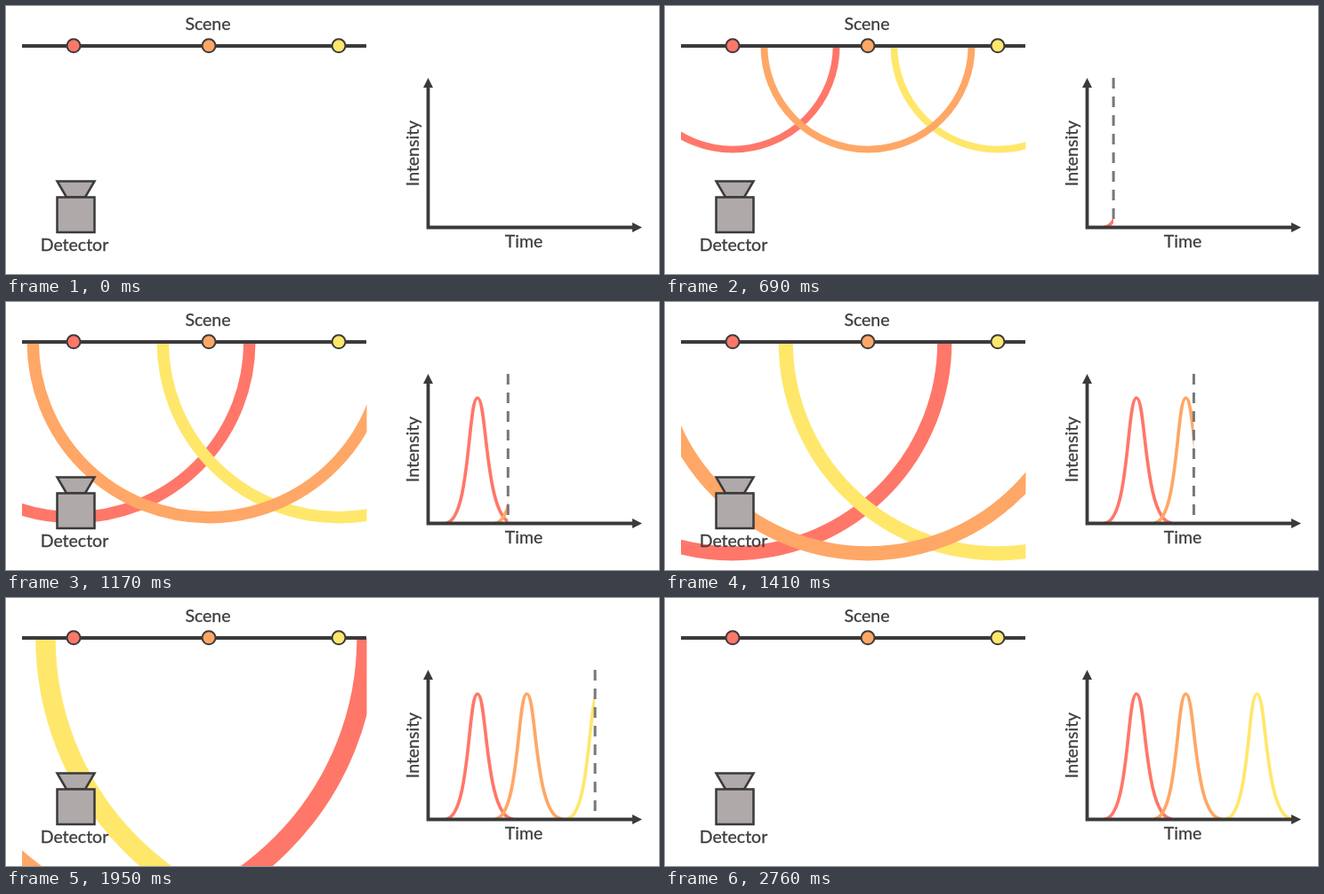
These frames come from a looping animation (734x302 px, 5.82 s). An HTML page:

```html
<!DOCTYPE html>
<html lang="en">
<head>
<meta charset="utf-8">
<title>Scene, detector and intensity over time</title>
<style>
  html, body { margin: 0; width: 100%; height: 100%; overflow: hidden; background: #fff; }
  svg { display: block; width: 100%; height: 100%; }
  text {
    font: 19.5px Lato, "Open Sans", sans-serif; text-anchor: middle;
    fill: #3f3e3f; stroke: #3f3e3f; stroke-width: .3;
  }
  .ink { stroke: #3b3a3b; }
  .wave, .curve { fill: none; }
  .curve { stroke-width: 3.7; }
</style>
</head>
<body>
<svg viewBox="0 0 734 302">
  <defs>
    <clipPath id="room"><rect x="18" y="45" width="387.5" height="257"/></clipPath>
    <clipPath id="seen"><rect id="reveal" x="474" y="80" height="175"/></clipPath>
  </defs>

  <g id="waves" clip-path="url(#room)"></g>
  <path class="ink" d="M18 45H405" stroke-width="3.8"/>
  <g id="dots" class="ink" stroke-width="2"></g>

  <g class="ink" fill="#afa9a9" stroke-width="2.5">
    <path d="M57.5 197.5H99.5L89 215.5H68Z"/>
    <rect x="57.5" y="215.5" width="42" height="39.5"/>
  </g>

  <g id="curves" clip-path="url(#seen)"></g>
  <path id="scan" d="M0 81V241" stroke="#777" stroke-width="3" stroke-dasharray="12 9"/>
  <path class="ink" d="M474.5 89V249.5H706" fill="none" stroke-width="3.8"/>
  <path d="M474.5 81l5.5 11h-11zM715 249.5l-11 5.5v-11z" fill="#3b3a3b"/>

  <text x="227" y="27">Scene</text>
  <text x="77" y="276">Detector</text>
  <text x="582" y="271.5">Time</text>
  <text transform="translate(463.5 166) rotate(-90)">Intensity</text>
</svg>
<script>
const LOOP = 5820, STEP = 30;
const SPEED = 0.169, SPREAD = 0.0115;   // wave radius and thickness per ms
const SCAN_START = 450, SCAN_END = 2280;

// Listed from back to front
const points = [
  { x: 76,  color: '#ff7769', peak: 530,   fade: [2250, 2500] },
  { x: 374, color: '#ffe76b', peak: 665.5, fade: [2200, 2390] },
  { x: 228, color: '#ffa766', peak: 585.5, fade: [2250, 2500] }
];

const $ = id => document.getElementById(id);

function add(parent, tag, attrs) {
  const el = document.createElementNS('http://www.w3.org/2000/svg', tag);
  set(el, attrs);
  return $(parent).appendChild(el);
}

function set(el, attrs) {
  for (const key in attrs) el.setAttribute(key, attrs[key]);
}

for (const p of points) {
  p.wave = add('waves', 'circle', { class: 'wave', cx: p.x, cy: 45, stroke: p.color });
  add('dots', 'circle', { cx: p.x, cy: 44.8, r: 7.5, fill: p.color });
  add('curves', 'path', {
    class: 'curve', stroke: p.color,
    d: `M${p.peak - 36} 249c28 0 25-141 36-141c11 0 8 141 40 141`
  });
}

const clamp = v => Math.max(0, Math.min(1, v));

function draw(t) {
  for (const { wave, fade: [from, to] } of points) {
    set(wave, {
      r: t * SPEED,
      'stroke-width': t * SPREAD,
      opacity: 1 - clamp((t - from) / (to - from))
    });
  }
  const scanX = 474 + 229.5 * clamp((t - SCAN_START) / (SCAN_END - SCAN_START));
  set($('reveal'), { width: scanX - 474 });
  set($('scan'), {
    transform: `translate(${scanX} 0)`,
    visibility: t > SCAN_START && t <= SCAN_END ? 'visible' : 'hidden'
  });
}

const start = performance.now();
function tick() {
  const t = (performance.now() - start) % LOOP;
  draw(Math.floor(t / STEP) * STEP);
  requestAnimationFrame(tick);
}
tick();
</script>
</body>
</html>
```
